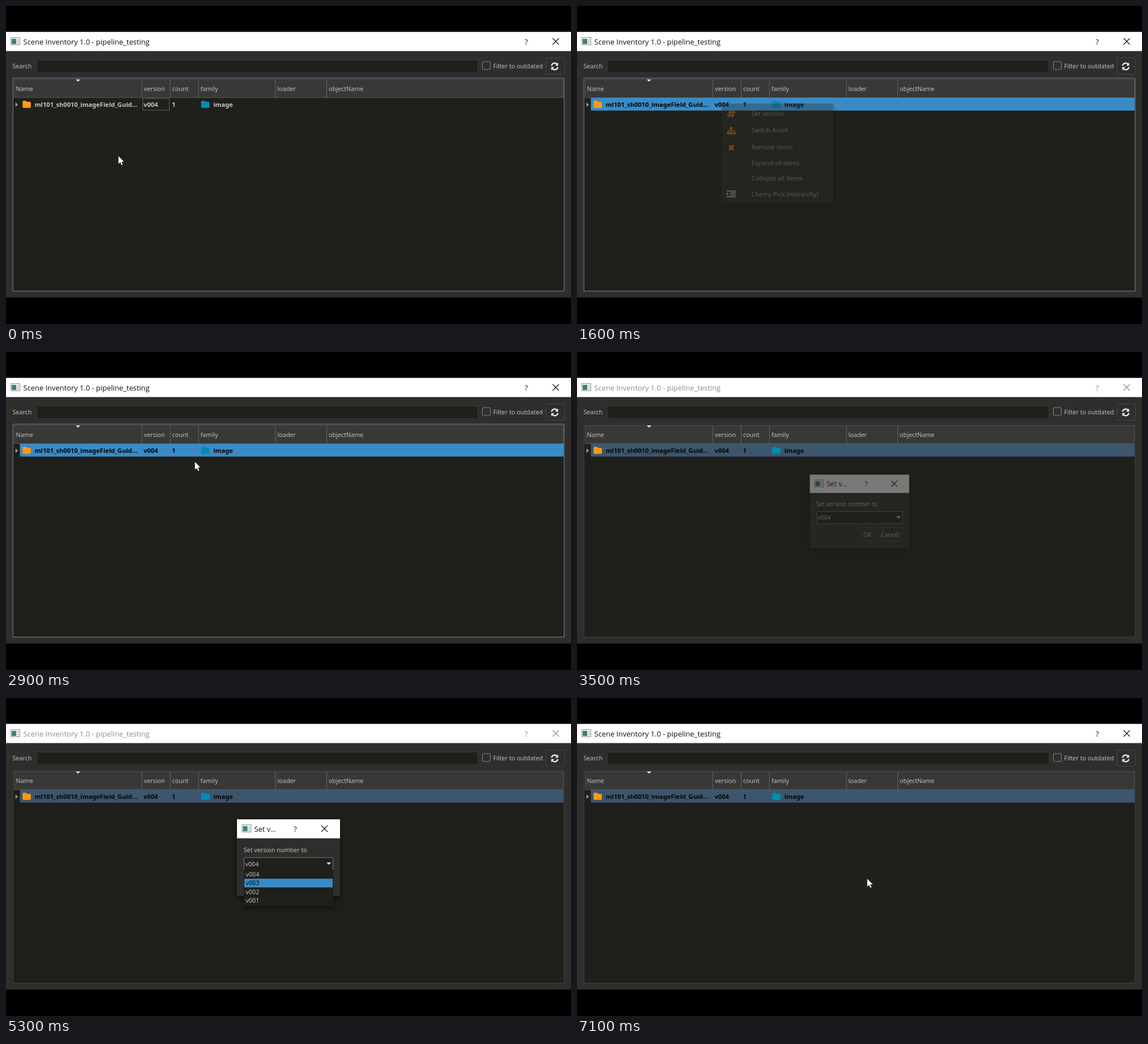
An HTML page that plays this animation: 998 px wide and 561 px high, repeating every 7.5 s.

```html
<!DOCTYPE html>
<html lang="en">
<head>
<meta charset="utf-8">
<title>Scene Inventory</title>
<style>
  html, body { margin: 0; width: 100%; height: 100%; overflow: hidden; background: #000; }
  svg { display: block; width: 998px; height: 561px; }
  text { font: 10.75px "Noto Sans", sans-serif; fill: #bebebd; white-space: pre; }
  .bold text { font-size: 11.1px; font-weight: 700; fill: inherit; }
  .menu text { font-size: 11.05px; }
  .bar text { font: 12.9px "Open Sans", sans-serif; fill: inherit; }
  .mid { text-anchor: middle; }
  #dialog { filter: drop-shadow(0 3px 6px rgba(0, 0, 0, .55)); transform-origin: 499px 281px; }
  #menu { filter: drop-shadow(2px 2px 2px rgba(0, 0, 0, .4)); }
</style>
</head>
<body>
<svg id="stage" viewBox="0 0 998 561"></svg>
<script>
const LOOP = 7500, STEP = 100;
const BODY = '#2f2e2c', DARK = '#1f1f1c', LINE = '#3c3c3a', FOCUS = '#6c788a',
      BLUE = '#3a8bc5', DULL = '#3c566d', ORANGE = '#fd9a17', TEAL = '#058cb3';

const rect = (x, y, w, h, fill, more = '') =>
  `<rect x="${x}" y="${y}" width="${w}" height="${h}" fill="${fill}" ${more}/>`;
const box = (x, y, w, h, fill, stroke, more = '') =>
  rect(x + .5, y + .5, w - 1, h - 1, fill, `stroke="${stroke}" ${more}`);
const text = (x, y, s, more = '') => `<text x="${x}" y="${y}" ${more}>${s}</text>`;
const path = (d, more) => `<path d="${d}" ${more}/>`;
const group = (id, body, more = '') => `<g id="${id}" ${more}>${body}</g>`;

const folder = (x, fill) =>
  path(`M${x} 169q0-1.700 1.700-1.700h4q1.500 0 2 1.700h5.300q1.700 0 1.700 1.700v7.300q0 1.700-1.700 1.700h-11.300q-1.700 0-1.700-1.700z`, `fill="${fill}"`);
const appIcon = (x, y) =>
  box(x, y, 17, 14, '#eef1f1', '#8d9799') + rect(x + 2, y + 3, 8, 9, '#3f7f78') +
  rect(x + 11.5, y + 3, 3.5, 9, '#d0d8d9');
const cross = (x, y) =>
  path(`M${x} ${y}l11 11m0-11l-11 11`, 'stroke="currentColor" stroke-width="1.2" fill="none"');

// Title bar contents share one colour through currentColor.
const titleBar = (x, y, title, helpX, closeX) =>
  text(x + 22, y + 12.5, title) + text(helpX, y + 12.5, '?', 'class="mid"') + cross(closeX, y + 2);

function mainWindow() {
  const columns = [[14, 'Name'], [240, 'version'], [290, 'count'], [340, 'family'], [476, 'loader'], [566.5, 'objectName']];
  const header = columns.map(([x, name], i) =>
    (i ? rect(x - .5, 129, 1, 33, '#656563') : '') + text(x + 3.6, 149.7, name)).join('');
  const half = path('M963.600 105.300a5.700 5.700 0 0 1 9.800-2.800', 'fill="none" stroke="#eee" stroke-width="2.200"') +
    path('M975.300 99.800v5.500h-5.500z', 'fill="#eee"');
  return rect(0, 45.7, 998, 468.6, BODY) + rect(0, 45.7, 998, 33.8, '#fff') + appIcon(8, 55) +
    group('title', titleBar(8.6, 55, 'Scene Inventory 1.0 - pipeline_testing', 919, 965.5), 'class="bar" fill="currentColor"') +
    text(11.4, 110, 'Search') + box(54, 95, 780, 23, DARK, '#353533', 'rx="2"') +
    box(841, 97.5, 15, 15, BODY, '#858583', 'rx="2"') + text(860.6, 109.5, 'Filter to outdated') +
    box(953, 91, 34, 30, BODY, '#454543', 'rx="2"') + half + `<g transform="rotate(180 969.2 106.500)">${half}</g>` +
    box(11.8, 126.8, 974.6, 376.6, DARK, FOCUS, 'id="frame" rx="2" stroke-width="1.2"') +
    box(14, 129, 971, 33, '#383836', '#555553') + header +
    path('M123 129.500h8.500l-4.200 4z', 'fill="#ddd"');
}

function row() {
  return rect(24.5, 162, 960.5, 22.5, BLUE, 'id="band"') +
    box(241, 162.7, 48, 21.6, 'none', '#a5a5a3', 'id="dots" stroke-dasharray="1 1"') +
    path('M16.800 170l4.200 4-4.200 4z', 'fill="#9d9d9b"') + folder(29.2, ORANGE) + folder(344.7, TEAL) +
    group('cells', text(50.7, 178, 'ml101_sh0010_imageField_Guid...') + text(243, 178, 'v004') +
      text(293, 178, '1') + text(366.2, 178, 'image'), 'class="bold"');
}

function menu() {
  const items = [[194, 'Set version'], [223, 'Switch Asset'], [253, 'Remove items'],
    [281, 'Expand all items'], [307.5, 'Collapse all items'], [335.5, 'Cherry-Pick (Hierarchy)']];
  const stroke = (c, w) => `fill="none" stroke="${c}" stroke-width="${w}"`;
  return box(256, 172, 196.5, 176, BODY, '#353533') + rect(258, 175, 193, 29, BLUE, 'id="hover"') +
    rect(260, 233, 185, 1, LINE) + rect(260, 263, 185, 1, LINE) +
    path('M271.500 184l-3 12.500m8.500-12.500l-3 12.500m-7.300-8.800h13.300m-15 5h13.300', stroke(ORANGE, 2.2)) +
    path('M270 213.500h5v4h-5zM265 222h4.500v4.500h-4.500zM270.300 222h4.500v4.500h-4.500zM275.800 222h4.500v4.500h-4.500z', `fill="${ORANGE}"`) +
    path('M272.500 217v5m-5.500 0v-2.500h11v2.500', stroke(ORANGE, 1.3)) +
    path('M268.500 246l8 8m0-8l-8 8', stroke(ORANGE, 3.4)) +
    path('M264.500 326.500h16m-10 3.300h10m-10 3.300h10m-16 3.400h16', stroke('#e4e4e4', 1.9)) +
    path('M264.500 328.500l4 3-4 3z', 'fill="#e4e4e4"') +
    items.map(([y, s], i) => text(308, y, s, i ? '' : 'id="first"')).join('');
}

function dialog() {
  const versions = ['v004', 'v003', 'v002', 'v001'];
  const list = rect(420, 302, 158, 64.5, DARK) + rect(421, 303.5, 156, 15.3, BLUE, 'id="pick"') +
    versions.map((v, i) => text(423.5, 315 + 15.3 * i, v, 'class="version"')).join('');
  return rect(408, 214, 182, 135, BODY) + rect(408, 214, 182, 33.5, '#fff') + appIcon(416.5, 223) +
    `<g class="bar" fill="#111" color="#111">${titleBar(416.5, 223, 'Set v...', 511, 557)}</g>` +
    text(419.7, 271.5, 'Set version number to') + box(420, 281, 158, 23, DARK, FOCUS, 'rx="1"') +
    text(422.5, 297, 'v004', 'id="value"') + path('M566 290h8.500l-4.250 4.300z', 'fill="#ddd"') +
    box(501, 310, 25, 27, BODY, LINE, 'id="ok" rx="1"') + text(513.5, 327.5, 'OK', 'class="mid"') +
    box(532, 310, 46, 27, BODY, '#454543', 'rx="1"') + text(555, 327.5, 'Cancel', 'class="mid"') +
    `<clipPath id="below"><rect x="418" y="302.500" width="164" height="68"/></clipPath>` +
    `<g id="drop" clip-path="url(#below)">${group('list', list)}</g>`;
}

const stage = document.getElementById('stage');
stage.innerHTML = mainWindow() + row() + group('menu', menu(), 'class="menu"') + group('dialog', dialog()) +
  group('cursor', path('M.4.300v14.800l3.400-3.200 2.400 5.200 2.400-1-2.300-5.100h4.500z',
    'fill="#fff" stroke="#111" stroke-width=".5"'));
const $ = id => document.getElementById(id);
const versionTexts = [...document.querySelectorAll('.version')];

// Each track holds [start time, value] steps.
const tracks = {
  band: [[0, 'none'], [800, BLUE], [3400, DULL]],
  ink: [[0, '#c6c6c4'], [800, '#fff'], [1600, '#050505']],
  frame: [[0, FOCUS], [3400, LINE]],
  title: [[0, '#111'], [3400, '#8e8e8e'], [6900, '#444'], [7100, '#111']],
  menu: [[0, 0], [1600, .35], [1700, .75], [1800, .95], [1900, 1], [2600, .4], [2700, .06], [2900, 0]],
  hover: [[0, 0], [2200, 1]],
  dialog: [[0, 0], [3500, .4], [3600, .8], [3700, 1], [6600, .6], [6700, .2], [6800, 0]],
  drop: [[0, 0], [4600, 1], [5700, 0]],
  slide: [[0, -20], [4700, -4], [4800, 0]],
  pick: [[0, 0], [5300, 1], [5400, 2]],
  value: [[0, 'v004'], [5700, 'v002']],
  ok: [[0, '#454543'], [6300, '#8795a8']],
  pointer: [[0, [198, 264]], [800, [256, 172]], [1600, null], [2600, [333, 193]], [3400, null], [6600, [512, 318]]]
};
const at = (name, t) => tracks[name].reduce((v, [start, next]) => t >= start ? next : v, null);

function pointerAt(t) {
  if (t >= 800) return at('pointer', t);
  const u = Math.min(t / 500, 1), e = u * u * (3 - 2 * u);
  return [198 + 58 * e, 264 - 92 * e];
}

function show(id, opacity) {
  $(id).style.display = opacity ? '' : 'none';
  $(id).style.opacity = opacity;
}

function draw(t) {
  $('band').setAttribute('fill', at('band', t));
  $('cells').setAttribute('fill', at('ink', t));
  $('frame').setAttribute('stroke', at('frame', t));
  $('title').setAttribute('color', at('title', t));
  show('dots', t < 800 ? 1 : 0);

  show('menu', at('menu', t));
  show('hover', at('hover', t));
  $('first').style.fill = at('hover', t) ? '#050505' : '';

  const open = at('dialog', t), pick = at('pick', t);
  show('dialog', open);
  $('dialog').style.transform = `scale(${.94 + .06 * open})`;
  show('drop', at('drop', t));
  $('list').setAttribute('transform', `translate(0 ${at('slide', t)})`);
  $('pick').setAttribute('y', 303.5 + 15.3 * pick);
  versionTexts.forEach((v, i) => v.style.fill = i === pick ? '#050505' : '');
  $('value').textContent = at('value', t);
  $('ok').setAttribute('stroke', at('ok', t));

  const p = pointerAt(t);
  show('cursor', p ? 1 : 0);
  if (p) $('cursor').setAttribute('transform', `translate(${p})`);
}

const begin = performance.now();
function tick(now) {
  const t = Math.max(0, now - begin) % LOOP;
  draw(Math.floor(t / STEP) * STEP);
  requestAnimationFrame(tick);
}
draw(0);
requestAnimationFrame(tick);
</script>
</body>
</html>
```
